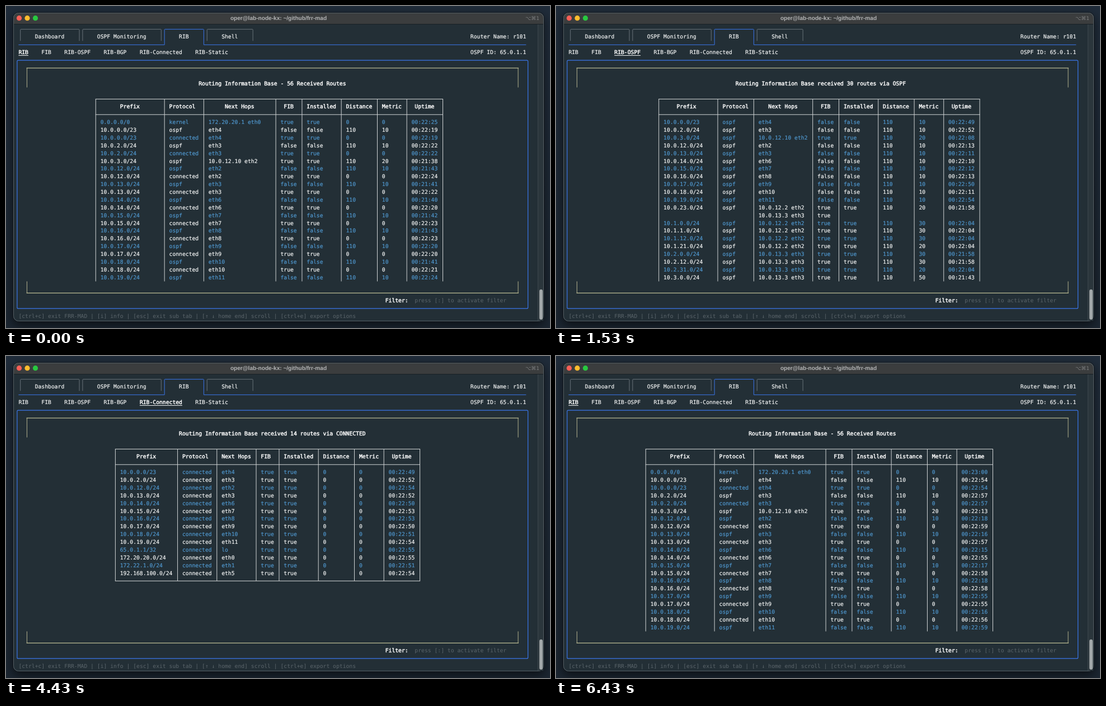
Write an HTML page that moves like this. It is 972 px wide and 576 px high and loops after 6.47 s.

```html
<!DOCTYPE html>
<html lang="en">
<head>
<meta charset="utf-8">
<title>Routing table browser</title>
<style>
  html, body { margin: 0; width: 100%; height: 100%; overflow: hidden; background: #1a232d; }
  svg { display: block; }
  text {
    font: 9.72px "DejaVu Sans Mono", monospace;
    text-rendering: geometricPrecision;
    white-space: pre;
    fill: #f1f3f3;
    stroke: #f1f3f3;
    stroke-width: .2px;
  }
  .bold { fill: #fff; stroke: #fff; stroke-width: .45px; }
  .blue { fill: #4f96cc; stroke: #4f96cc; }
  .dim { fill: #5b656b; stroke: none; }
  .bar { font: bold 10.1px "Liberation Sans", Arial, sans-serif; fill: #b4b5b6; stroke: none; }
  .keys { font: 9px "DejaVu Sans", sans-serif; fill: #7d7f80; stroke: none; }
  .window { filter: drop-shadow(0 6px 9px rgba(0, 0, 0, .55)); }
  path { fill: none; stroke-width: 1; }
</style>
</head>
<body>
<svg id="stage" width="972" height="576" viewBox="0 0 972 576">
  <defs>
    <linearGradient id="desk" x1="0" y1="0" x2="0" y2="1">
      <stop offset="0" stop-color="#202c3a"/>
      <stop offset="1" stop-color="#1c2631"/>
    </linearGradient>
  </defs>
  <rect width="972" height="576" fill="url(#desk)"/>
  <rect class="window" x="12.5" y="11.5" width="949" height="553" rx="9.5" fill="#232f36" stroke="#0f151b"/>
  <path d="M13 33V21a9 9 0 0 1 9-9H952a9 9 0 0 1 9 9V33Z" style="fill:#3b3d3e"/>
  <rect x="13.5" y="12.5" width="947" height="551" rx="9" fill="none" stroke="#566066"/>
  <path d="M14 32.5H960" stroke="#181f24"/>
  <rect x="950" y="33" width="10" height="530" fill="#2b363c"/>
  <path d="M950.5 33V563" stroke="#3d474c"/>
  <rect x="953" y="507" width="6" height="54" rx="3" fill="#a2a7a9"/>
  <circle cx="23.5" cy="21.7" r="4.6" fill="#fe5f57"/>
  <circle cx="38" cy="21.7" r="4.6" fill="#febc2e"/>
  <circle cx="52.5" cy="21.7" r="4.6" fill="#28c840"/>
  <text class="bar" x="487" y="25" text-anchor="middle">oper@lab-node-kx: ~/github/frr-mad</text>
  <text class="keys" x="953" y="24.5" text-anchor="end">⌥⌘1</text>
</svg>
<script>
const LOOP = 6470;
const X0 = 22.4, Y0 = 41.1, CW = 5.851, RH = 13.877;
const LAST_ROW = 32;
const BLUE = '#3a76ea', GREY = '#69737a', PALE = '#dcdaa8', RULE = '#d0d4d5';

const HEADS = ['Prefix', 'Protocol', 'Next Hops', 'FIB', 'Installed', 'Distance', 'Metric', 'Uptime'];
const DISTANCE = { kernel: 0, ospf: 110, connected: 0, bgp: 20, static: 1 };

// protocol, prefix, metric, uptime, next hops
const ROUTES = `
kernel 0.0.0.0/0 0 22:55 172.20.20.1 eth0
ospf 10.0.0.0/23 10 22:49 eth4
connected 10.0.0.0/23 0 22:49 eth4
ospf 10.0.2.0/24 10 22:52 eth3
connected 10.0.2.0/24 0 22:52 eth3
ospf 10.0.3.0/24 20 22:08 10.0.12.10 eth2
ospf 10.0.12.0/24 10 22:13 eth2
connected 10.0.12.0/24 0 22:54 eth2
ospf 10.0.13.0/24 10 22:11 eth3
connected 10.0.13.0/24 0 22:52 eth3
ospf 10.0.14.0/24 10 22:10 eth6
connected 10.0.14.0/24 0 22:50 eth6
ospf 10.0.15.0/24 10 22:12 eth7
connected 10.0.15.0/24 0 22:53 eth7
ospf 10.0.16.0/24 10 22:13 eth8
connected 10.0.16.0/24 0 22:53 eth8
ospf 10.0.17.0/24 10 22:50 eth9
connected 10.0.17.0/24 0 22:50 eth9
ospf 10.0.18.0/24 10 22:11 eth10
connected 10.0.18.0/24 0 22:51 eth10
ospf 10.0.19.0/24 10 22:54 eth11
connected 10.0.19.0/24 0 22:54 eth11
ospf 10.0.23.0/24 20 21:58 10.0.12.2 eth2,10.0.13.3 eth3
ospf 10.1.0.0/24 30 22:04 10.0.12.2 eth2
ospf 10.1.1.0/24 30 22:04 10.0.12.2 eth2
ospf 10.1.12.0/24 30 22:04 10.0.12.2 eth2
ospf 10.1.21.0/24 20 22:04 10.0.12.2 eth2
ospf 10.2.0.0/24 30 21:58 10.0.13.3 eth3
ospf 10.2.12.0/24 30 21:58 10.0.13.3 eth3
ospf 10.2.31.0/24 20 22:04 10.0.13.3 eth3
ospf 10.3.0.0/24 50 21:43 10.0.13.3 eth3
bgp 10.20.0.0/24 20 21:56 172.22.1.2 eth1
bgp 10.20.3.0/24 20 22:28 172.22.1.2 eth1
bgp 10.20.4.0/24 20 22:30 172.22.1.2 eth1
bgp 10.20.13.0/32 30 22:27 172.22.1.2 eth1
bgp 10.20.14.0/32 30 22:29 172.22.1.2 eth1
connected 65.0.1.1/32 0 22:55 lo
bgp 65.0.2.3/32 30 22:27 172.22.1.2 eth1
bgp 65.0.2.4/32 30 22:29 172.22.1.2 eth1
connected 172.20.20.0/24 0 22:55 eth0
connected 172.22.1.0/24 0 22:51 eth1
static 192.168.1.0/24 0 22:54 192.168.100.91 eth5
connected 192.168.100.0/24 0 22:54 eth5
bgp 192.168.100.202/32 10 21:56 172.22.1.2 eth1
bgp 192.168.100.203/32 10 22:28 172.22.1.2 eth1
bgp 192.168.100.204/32 10 22:30 172.22.1.2 eth1
`.trim().split('\n').map(line => {
  const [proto, prefix, metric, up, ...rest] = line.split(' ');
  const hops = rest.join(' ').split(',');
  const [min, sec] = up.split(':').map(Number);
  const active = !(proto === 'ospf' && hops[0].startsWith('eth'));
  return { proto, prefix, metric, hops, active, up: min * 60 + sec };
});

const via = (count, proto) => `Routing Information Base received ${count} routes via ${proto.toUpperCase()}`;
const byProto = (tab, col, proto, count, widths) =>
  ({ tab, col, widths, title: via(count, proto), keep: r => r.proto === proto });

// widths: Prefix, Protocol, Next Hops, FIB
const VIEWS = {
  rib: { tab: 'RIB', col: 0, widths: [18, 9, 19, 5], keep: () => true,
    title: 'Routing Information Base - 56 Received Routes' },
  fib: { tab: 'FIB', col: 7, widths: [18, 9, 19, 4], keep: r => r.active,
    title: 'Forwarding Information Base - 46 Installed Routes' },
  ospf: byProto('RIB-OSPF', 14, 'ospf', 30, [15, 8, 15, 5]),
  bgp: byProto('RIB-BGP', 26, 'bgp', 10, [18, 8, 15, 4]),
  connected: byProto('RIB-Connected', 37, 'connected', 14, [16, 9, 9, 4]),
  static: byProto('RIB-Static', 54, 'static', 1, [14, 8, 19, 4]),
};

// start in ms, view, seconds added to the uptimes
const STEPS = [
  [0, 'rib', -30], [30, 'rib', 0], [570, 'fib', 0], [1530, 'ospf', 0],
  [2800, 'bgp', 0], [4000, 'connected', 0], [5100, 'static', 5], [6400, 'rib', 5],
];

const stage = document.getElementById('stage');
// Line centres of a cell, and the boundary above a row.
const cx = col => X0 + (col + .5) * CW + .4;
const cy = row => Y0 + row * RH + .5;
const edge = row => cy(row - .5);

function add(parent, name, attrs, content = '') {
  const el = document.createElementNS('http://www.w3.org/2000/svg', name);
  for (const key in attrs) el.setAttribute(key, attrs[key]);
  el.textContent = content;
  return parent.appendChild(el);
}
const text = (parent, col, row, str, cls = '') =>
  add(parent, 'text', { x: X0 + col * CW, y: Y0 + row * RH + 3.5, class: cls }, str);
const line = (parent, d, stroke, width = 1) =>
  add(parent, 'path', { d, stroke, 'stroke-width': width });

function drawTab(label, left, right, active) {
  const l = cx(left), r = cx(right), top = cy(0);
  const bottom = active ? cy(2) : edge(2);
  const d = `M${l} ${bottom}V${top + 1}q0-1 1-1H${r - 1}q1 0 1 1V${bottom}`;
  line(stage, d, active ? BLUE : GREY, active ? 1.2 : 1);
  text(stage, left + 5, 1, label);
}

function drawChrome() {
  drawTab('Dashboard', 0, 18);
  drawTab('OSPF Monitoring', 19, 43);
  drawTab('RIB', 44, 56, true);
  drawTab('Shell', 57, 71);
  line(stage, `M${X0} ${cy(2)}H${cx(44)}M${cx(56)} ${cy(2)}H${X0 + 155 * CW}`, BLUE, 1.3);
  text(stage, 138, 1, 'Router Name: r101');
  text(stage, 138, 3, 'OSPF ID: 65.0.1.1');

  const left = cx(-1), top = cy(4);
  add(stage, 'rect', { x: left, y: top, width: cx(155) - left, height: cy(36) - top,
    rx: 2, fill: 'none', stroke: BLUE, 'stroke-width': 1.2 });

  const l = cx(2), r = cx(152);
  const upper = cy(5), lower = cy(34);
  const sides = (a, b) => `M${l} ${a}V${b}M${r} ${a}V${b}`;
  line(stage, sides(upper, edge(8)) + sides(edge(33), lower), '#b3b38e', 1.6);
  line(stage, `M${l - .8} ${upper}H${r + .8}M${l - .8} ${lower}H${r + .8}`, PALE, 1.5);

  text(stage, 112, 35, 'Filter:', 'bold');
  text(stage, 121, 35, 'press [:] to activate filter', 'dim');
  text(stage, 0, 37, '[ctrl+c] exit FRR-MAD | [i] info | [esc] exit sub tab | [↑ ↓ home end] scroll | [ctrl+e] export options', 'dim');
}

function drawSubTabs(g, current) {
  for (const view of Object.values(VIEWS)) {
    const on = view === current;
    text(g, view.col, 3, view.tab, on ? 'bold' : '');
    if (!on) continue;
    const x = X0 + view.col * CW;
    line(g, `M${x} 88.5H${x + view.tab.length * CW}`, '#f1f3f3');
  }
}

function clock(sec) {
  const two = n => String(n).padStart(2, '0');
  return `00:${two(Math.floor(sec / 60))}:${two(sec % 60)}`;
}

// One array of cells per screen line; extra hops add lines.
function cellLines(route, shift) {
  const flag = String(route.active);
  return route.hops.map((hop, i) => i ? ['', '', hop, flag] : [
    route.prefix, route.proto, hop, flag, flag,
    String(DISTANCE[route.proto]), route.metric, clock(route.up + shift),
  ]);
}

function drawTable(g, view, shift) {
  const widths = [...view.widths, 9, 8, 6, 8];
  const total = widths.reduce((sum, w) => sum + w + 3, 1);
  const cols = [Math.floor((153 - total) / 2)];
  for (const w of widths) cols.push(cols.at(-1) + w + 3);

  HEADS.forEach((head, i) => {
    const pad = Math.floor((widths[i] + 2 - head.length) / 2);
    text(g, cols[i] + 1 + pad, 10, head, 'bold');
  });

  let row = 12;
  ROUTES.filter(view.keep).forEach((route, n) => {
    for (const cells of cellLines(route, shift)) {
      if (row <= LAST_ROW) {
        cells.forEach((cell, i) => cell && text(g, cols[i] + 2, row, cell, n % 2 ? '' : 'blue'));
      }
      row++;
    }
  });

  const closed = row <= LAST_ROW;
  const bottom = closed ? cy(row) : edge(LAST_ROW + 1);
  const across = y => `M${cx(cols[0]) - .5} ${y}H${cx(cols.at(-1)) + .5}`;
  const down = cols.map(c => `M${cx(c)} ${cy(9)}V${bottom}`).join('');
  line(g, across(cy(9)) + across(cy(11)) + (closed ? across(bottom) : '') + down, RULE);
}

function drawScreen([, name, shift]) {
  const view = VIEWS[name];
  const g = add(stage, 'g', { visibility: 'hidden' });
  drawSubTabs(g, view);
  text(g, Math.floor((155 - view.title.length) / 2), 7, view.title, 'bold');
  drawTable(g, view, shift);
  return g;
}

drawChrome();
const screens = STEPS.map(drawScreen);
let shown = -1;

function tick() {
  const t = performance.now() % LOOP;
  const now = STEPS.findLastIndex(([start]) => start <= t);
  if (now !== shown) {
    screens.forEach((g, i) => g.setAttribute('visibility', i === now ? 'visible' : 'hidden'));
    shown = now;
  }
  requestAnimationFrame(tick);
}
tick();
</script>
</body>
</html>
```
